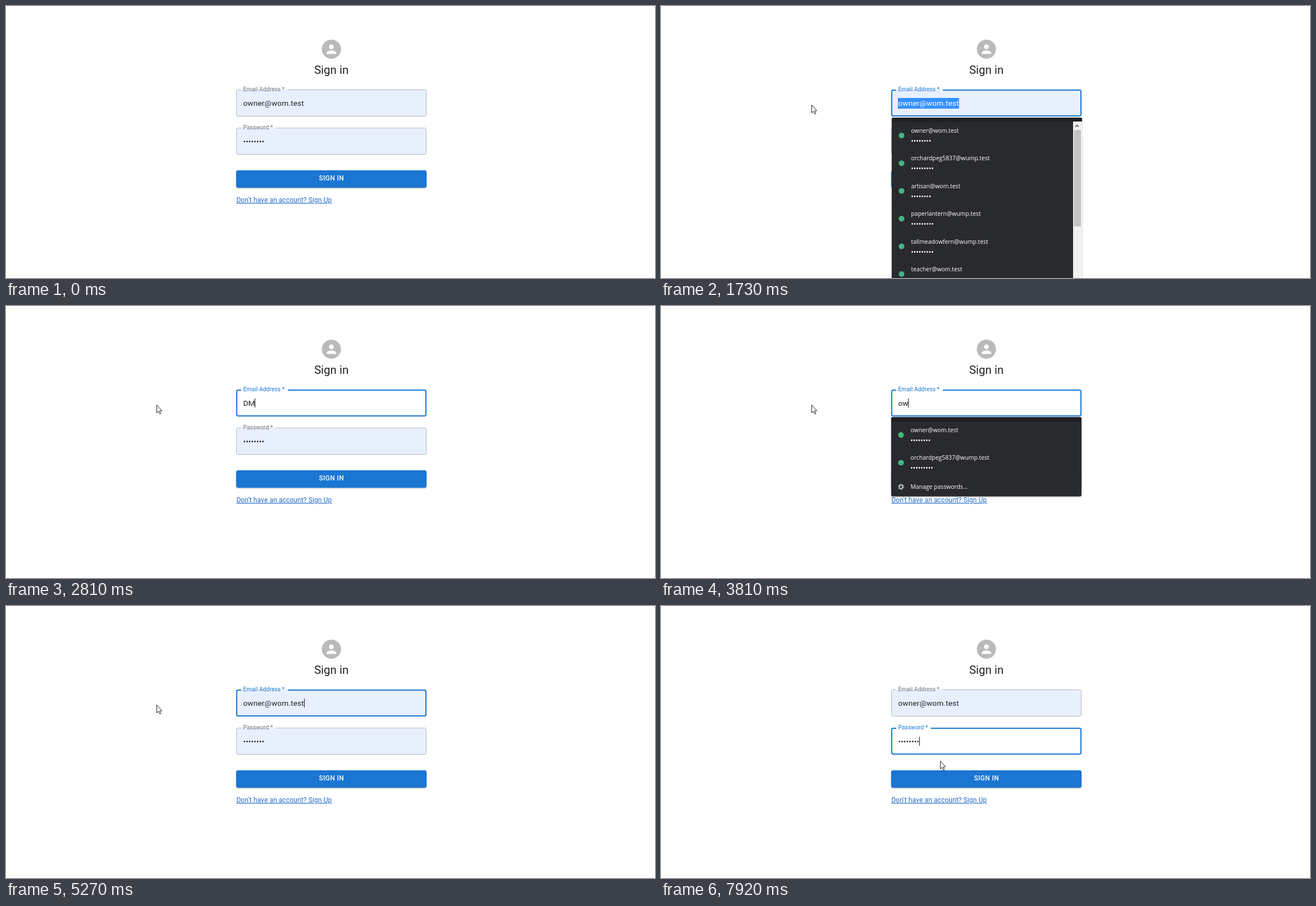
An HTML page for the animation above (7990 ms loop, 1156x485 px).

```html
<!DOCTYPE html>
<html lang="en">
<head>
<meta charset="utf-8">
<title>Sign in</title>
<style>
  html, body { margin: 0; width: 100%; height: 100%; overflow: hidden; background: #fff; }
  svg { display: block; width: 1156px; height: 485px; font-family: Roboto, sans-serif; }
  .title { font-size: 20.5px; fill: #212121; }
  .value { font-size: 13.68px; letter-spacing: .128px; fill: #212121; white-space: pre; }
  .value.preview { font: 11.07px "Open Sans", sans-serif; letter-spacing: 0; }
  .label { font-size: 10.26px; letter-spacing: .096px; fill: #747474; }
  .outline { fill: none; stroke: #b4b6bc; stroke-width: 1; }
  .hover .outline { stroke: #212121; }
  .focus .outline { stroke: #1976d2; stroke-width: 2; }
  .focus .label { fill: #1976d2; }
  .selection { fill: #3390ff; }
  .caret { fill: #111; }
  .button { fill: #1976d2; filter: drop-shadow(0 1px .8px rgba(0, 0, 0, .35)); }
  .button-text { font-size: 11.97px; font-weight: 500; letter-spacing: .342px; fill: #fff; }
  .link { font-size: 11.97px; letter-spacing: .128px; fill: #1f6ac6;
          text-decoration: underline; text-decoration-color: #82aee2; text-underline-offset: 1.5px; }
  .menu { font-family: "Open Sans", sans-serif; font-size: 10.4px; fill: #fff;
          filter: drop-shadow(0 1px 1px rgba(0, 0, 0, .3)); }
  .menu .dots { font-size: 12px; }
</style>
</head>
<body>
<svg viewBox="0 0 1156 485">
  <circle cx="579.6" cy="77" r="17.1" fill="#bababa"/>
  <path transform="translate(566.8 64.2) scale(1.068)" fill="#fff"
    d="M12 12c2.21 0 4-1.79 4-4s-1.79-4-4-4-4 1.79-4 4 1.79 4 4 4zm0 2c-2.67 0-8 1.34-8 4v2h16v-2c0-2.66-5.33-4-8-4z"/>
  <text class="title" x="579.6" y="121" text-anchor="middle">Sign in</text>
  <g id="fields"></g>
  <rect class="button" x="410" y="293" width="339" height="31" rx="3.4"/>
  <text class="button-text" x="579.8" y="311" text-anchor="middle">SIGN IN</text>
  <text class="link" x="410.4" y="350">Don't have an account? Sign Up</text>
  <g id="menus"></g>
  <g id="cursor">
    <circle id="press" cx="-1" r="10" fill="#ece63a" fill-opacity=".88"/>
    <path id="arrow" d="M.5 .5V14.6L3.6 11.7 5.8 16.6 7.9 15.7 5.7 10.9H9.8Z" fill="#fff" stroke="#222" stroke-width="1"/>
    <path id="beam" d="M-2.8 -6.5H-.7L.5 -5.8 1.7 -6.5H3.6M-2.8 7H-.7L.5 6.3 1.7 7H3.6M.5 -6V6.5" fill="none" stroke="#333" stroke-width=".9"/>
  </g>
</svg>
<script>
const LOOP = 7990;
const LEFT = 410, RIGHT = 749, WIDTH = RIGHT - LEFT, TEXT_X = 422.4, FIELD_H = 48, RADIUS = 3.4;
const EMAIL = 'owner@wom.test';
const ACCOUNTS = [
  [EMAIL, 8], ['orchardpeg5837@wump.test', 9], ['artisan@wom.test', 8],
  ['paperlantern@wump.test', 9], ['tallmeadowfern@wump.test', 9], ['teacher@wom.test', 8]
];
const $ = id => document.getElementById(id);
const show = (el, on) => el.setAttribute('visibility', on ? 'visible' : 'hidden');
const within = (t, from, to) => t >= from && t < to;
const bullets = n => '•'.repeat(n);

// Latest value of a [time, value] list
const at = (t, steps) => steps.filter(s => s[0] <= t).pop()[1];

function addGroup(parent, markup) {
  const g = document.createElementNS('http://www.w3.org/2000/svg', 'g');
  g.innerHTML = markup;
  $(parent).append(g);
  return g;
}

// Rounded border, drawn inside the box and open behind the label
function outlinePath(top, gap, stroke) {
  const inset = stroke / 2, r = RADIUS - inset;
  const l = LEFT + inset, right = RIGHT - inset, y = top + inset, b = top + FIELD_H - inset;
  const corner = (dx, dy) => `a${r} ${r} 0 0 1 ${dx * r} ${dy * r}`;
  return `M${gap} ${y}H${right - r}${corner(1, 1)}V${b - r}${corner(-1, 1)}` +
    `H${l + r}${corner(-1, -1)}V${y + r}${corner(1, -1)}H419`;
}

function makeField(label, top, gap) {
  const g = addGroup('fields', `
    <rect class="fill" x="${LEFT}" y="${top}" width="${WIDTH}" height="${FIELD_H}" rx="${RADIUS}"/>
    <path class="outline"/>
    <text class="label" x="${TEXT_X}" y="${top + 3}">${label}</text>
    <rect class="selection" x="${TEXT_X - .4}" y="${top + 15}" height="19"/>
    <text class="value" x="${TEXT_X}" y="${top + 29}"></text>
    <rect class="caret" y="${top + 16}" width="1" height="16"/>`);
  const [fill, outline, selection, value, caret] =
    ['fill', 'outline', 'selection', 'value', 'caret'].map(name => g.querySelector('.' + name));

  return s => {
    const hover = within(s.pointer.x, LEFT, RIGHT) && within(s.pointer.y, top, top + FIELD_H);
    g.setAttribute('class', s.focus ? 'focus' : hover && s.pointer.visible ? 'hover' : '');
    fill.setAttribute('fill', s.filled ? '#e8f0fe' : '#fff');
    outline.setAttribute('d', outlinePath(top, gap, s.focus ? 2 : 1));
    value.setAttribute('class', s.preview ? 'value preview' : 'value');
    value.textContent = s.text;
    value.style.fill = s.selected ? '#fff' : '';
    const length = s.text ? value.getComputedTextLength() : 0;
    selection.setAttribute('width', length + .4);
    show(selection, s.selected);
    caret.setAttribute('x', Math.round(TEXT_X + length - .3));
    show(caret, s.caret);
  };
}

function makeMenu(rows, full) {
  const top = 198, rowH = 49.4, end = 206 + rowH * rows;
  const rect = (x, y, w, h, fill, more = '') =>
    `<rect x="${x}" y="${y}" width="${w}" height="${h}" fill="${fill}" ${more}/>`;
  const items = ACCOUNTS.slice(0, rows).map(([name, count], i) => {
    const y = 206 + i * rowH;
    return `<circle cx="427.5" cy="${y + 24}" r="5" fill="#41b883"/>
      <text x="444.5" y="${y + 19}">${name}</text>
      <text class="dots" x="444.2" y="${y + 38}">${bullets(count)}</text>`;
  }).join('');
  const footer = `
    <circle cx="427.5" cy="273" r="3.1" fill="none" stroke="#a9acb0" stroke-width="2.4"/>
    <circle cx="427.5" cy="273" r="4.7" fill="none" stroke="#a9acb0" stroke-width="1.6" stroke-dasharray="2.46"/>
    <text x="444.5" y="277">Manage passwords...</text>`;
  const scrollbar = rect(733, 205, 16, 290, '#f1f1f1') + rect(734.5, 220, 12.5, 172, '#c4c4c4') +
    '<path d="M737 214.5L740 211.5 743 214.5" fill="none" stroke="#505050" stroke-width="1.6"/>';
  const g = addGroup('menus',
    rect(LEFT, top, WIDTH, full ? 300 : end + 34.6 - top, '#292a2d', 'rx="3"') +
    rect(LEFT, top, WIDTH, 8, '#1f2023', 'rx="3"') +
    rect(LEFT, 206, WIDTH, rowH + .4, '#3e4041', 'class="active" visibility="hidden"') + items +
    (full ? scrollbar : `<g transform="translate(0 ${end - 255.4})">${footer}</g>`));
  g.setAttribute('class', 'menu');
  if (full) g.setAttribute('transform', 'translate(1 1)');
  return g;
}

const drawEmail = makeField('Email Address *', 149, 502);
const drawPassword = makeField('Password *', 217, 480.5);
const fullMenu = makeMenu(6, true), pairMenu = makeMenu(2), singleMenu = makeMenu(1);

// Pointer moves: start, step length, steps, from, to
const MOVES = [
  [450, 65, 2, [1071, 468], [804, 328]],
  [710, 70, 7, [804, 328], [542, 167]],
  [1490, 60, 3, [542, 167], [268, 176]],
  [5470, 70, 5, [268, 176], [460, 242]],
  [7780, 70, 2, [460, 242], [497, 276]]
];

function pointerAt(t) {
  const [start, step, count, a, b] = MOVES.filter(m => m[0] <= t).pop() || MOVES[0];
  const p = Math.min(1, Math.max(0, Math.floor((t - start) / step) / count));
  const e = count > 3 ? p * p * (3 - 2 * p) : p;
  return {
    x: a[0] + (b[0] - a[0]) * e,
    y: a[1] + (b[1] - a[1]) * e,
    visible: t >= 450 && !within(t, 6560, 7850)
  };
}

function drawPointer(t, { x, y, visible }) {
  const dragging = within(t, 1400, 1730);
  const pressed = dragging || within(t, 5820, 5890) || within(t, 5960, 6030);
  const inField = within(x, LEFT, RIGHT) && (within(y, 149, 197) || within(y, 217, 265));
  const beam = inField || dragging;
  $('cursor').setAttribute('transform', `translate(${x} ${y})`);
  show($('press'), visible && pressed);
  show($('beam'), visible && beam);
  show($('arrow'), visible && !beam);
}

const EMAIL_TEXT = [[0, EMAIL], [2600, 'DM'], [3340, 'D'], [3470, ''], [3600, 'o'],
  [3810, 'ow'], [3880, 'own'], [4070, 'owne'], [4210, 'owner'], [4730, EMAIL]];
const PASSWORD_DOTS = [[0, 8], [6560, 1], [6700, 2], [6770, 3], [6970, 4], [7170, 5],
  [7310, 6], [7380, 7], [7650, 8]];
const FULL_FADE = [[0, 0], [1550, .35], [1610, .75], [1670, .95], [1730, 1],
  [2600, .92], [2670, .5], [2740, .18], [2810, 0]];
const PAIR_FADE = [[0, 0], [3740, .6], [3810, 1], [3880, 0]];
const SINGLE_FADE = [[0, 0], [3880, 1], [5130, .7], [5200, .3], [5270, 0]];

function draw(t) {
  const pointer = pointerAt(t);
  const preview = within(t, 4730, 5130);
  const emailFocus = within(t, 1400, 5820);
  const emailSelected = within(t, 1550, 2600);
  const passwordSelected = within(t, 5960, 6560);
  drawEmail({
    pointer, preview,
    text: at(t, EMAIL_TEXT),
    focus: emailFocus,
    filled: t < 2600 || t >= 4730,
    selected: emailSelected,
    caret: emailFocus && !emailSelected && !preview && !within(t, 3070, 3340)
  });
  drawPassword({
    pointer,
    text: bullets(at(t, PASSWORD_DOTS)),
    focus: t >= 5820,
    filled: t < 6560,
    selected: passwordSelected,
    caret: t >= 5820 && !passwordSelected
  });
  fullMenu.style.opacity = at(t, FULL_FADE);
  pairMenu.style.opacity = at(t, PAIR_FADE);
  singleMenu.style.opacity = at(t, SINGLE_FADE);
  show(singleMenu.querySelector('.active'), within(t, 4730, 5270));
  drawPointer(t, pointer);
}

const begin = performance.now();
function frame() {
  draw((performance.now() - begin) % LOOP);
  requestAnimationFrame(frame);
}
frame();
</script>
</body>
</html>
```
